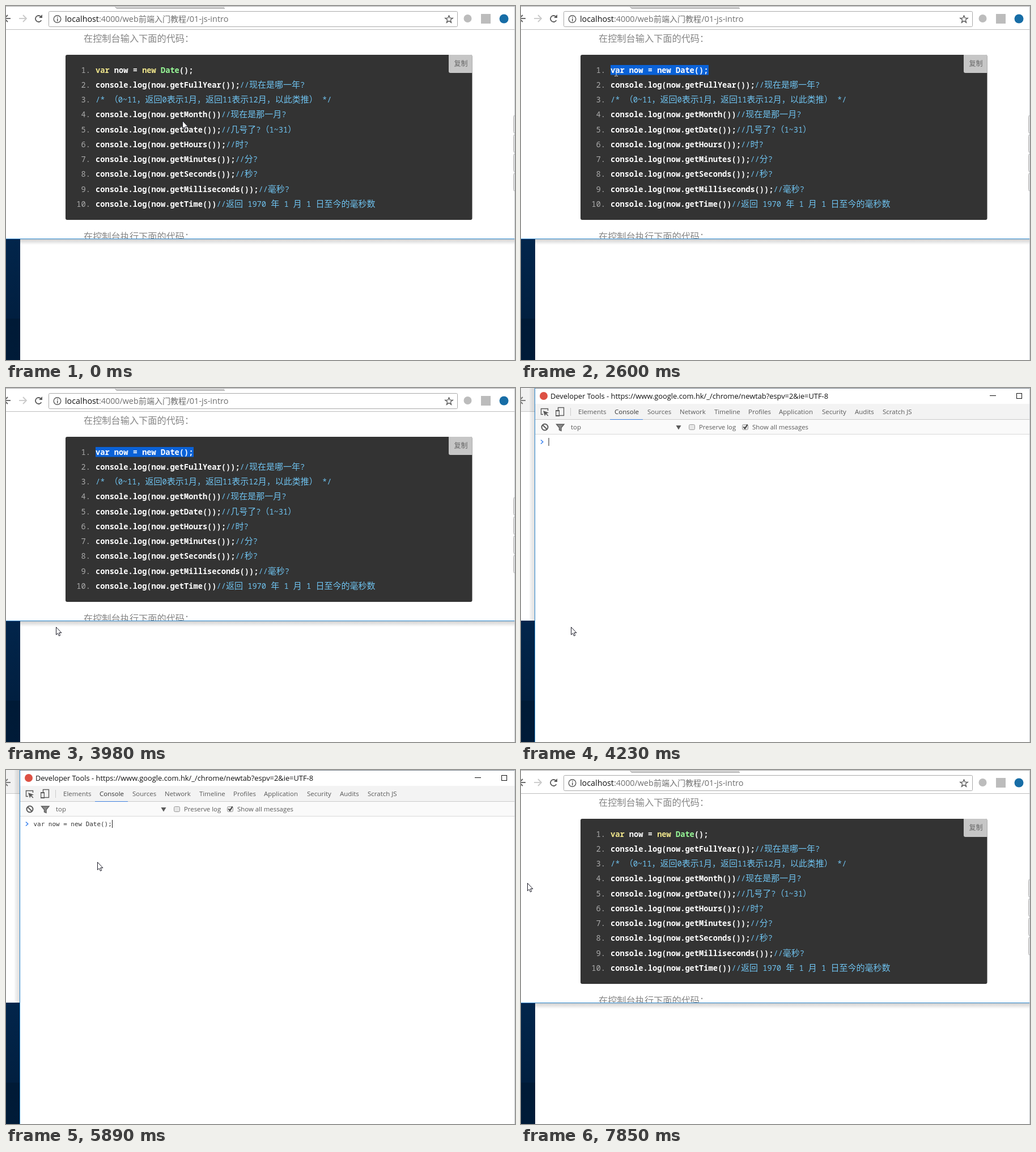
Write an HTML page with a canvas that moves like this. It is 898 by 624 pixels and loops after 8000 ms.

```html
<!DOCTYPE html>
<html lang="zh-CN">
<head>
<meta charset="utf-8">
<title>Console demo</title>
<style>
html, body { margin: 0; width: 100%; height: 100%; overflow: hidden; background: #fff; }
canvas { display: block; }
</style>
</head>
<body>
<canvas id="stage" width="898" height="624"></canvas>
<script>
const g = document.getElementById('stage').getContext('2d');
const LOOP = 8000;
const UI = '"Open Sans", "Noto Sans", sans-serif';
const HAN = '"Noto Sans CJK SC", "Noto Sans CJK", sans-serif';
const CODE = '"Noto Sans Mono", "DejaVu Sans Mono", monospace';
const CONSOLE = '"DejaVu Sans Mono", "Noto Sans Mono", monospace';
const SKY = '#6fc3f0';

const LINES = [
  'var now = new Date();',
  'console.log(now.getFullYear());//现在是哪一年?',
  '/* （0~11，返回0表示1月，返回11表示12月，以此类推） */',
  'console.log(now.getMonth())//现在是那一月?',
  'console.log(now.getDate());//几号了?（1~31）',
  'console.log(now.getHours());//时?',
  'console.log(now.getMinutes());//分?',
  'console.log(now.getSeconds());//秒?',
  'console.log(now.getMilliseconds());//毫秒?',
  'console.log(now.getTime())//返回 1970 年 1 月 1 日至今的毫秒数'
];

// Pointer moves: start, end, number of jumps, goal x, goal y
const MOVES = [
  [380, 500, 2, 400, 168], [630, 880, 3, 352, 120],
  [1190, 2160, 8, 159, 120], [2320, 2600, 3, 168, 117],
  [2870, 3300, 4, 196, 124], [3570, 3980, 4, 88, 421],
  [4370, 4520, 2, 98, 175], [4650, 4920, 3, 101, 158],
  [5200, 5890, 6, 161, 162], [7030, 7450, 4, 11, 199]
];

function pointer(t) {
  let x = 311, y = 202;
  for (const [from, to, n, gx, gy] of MOVES) {
    if (t < from) break;
    const k = Math.min(1, (Math.floor((t - from) / (to - from) * (n - 1) + 1e-6) + 1) / n);
    x += (gx - x) * k;
    y += (gy - y) * k;
  }
  return [x, y];
}

function rect(x, y, w, h, color) {
  g.fillStyle = color;
  g.fillRect(x, y, w, h);
}

function round(x, y, w, h, r, fill, line) {
  g.beginPath();
  g.roundRect(x, y, w, h, r);
  if (fill) { g.fillStyle = fill; g.fill(); }
  if (line) { g.strokeStyle = line; g.lineWidth = 1; g.stroke(); }
}

function path(points, color, width, fill) {
  g.beginPath();
  points.forEach(([x, y], i) => i ? g.lineTo(x, y) : g.moveTo(x, y));
  if (fill) { g.closePath(); g.fillStyle = fill; g.fill(); }
  if (width) { g.strokeStyle = color; g.lineWidth = width; g.stroke(); }
}

function arc(x, y, r, color, width, a = 0, b = 7) {
  g.beginPath();
  g.arc(x, y, r, a, b);
  g.strokeStyle = color;
  g.lineWidth = width;
  g.stroke();
}

function dot(x, y, r, color) {
  g.beginPath();
  g.arc(x, y, r, 0, 7);
  g.fillStyle = color;
  g.fill();
}

function text(s, x, y, font, color) {
  g.font = font;
  g.fillStyle = color;
  g.fillText(s, x, y);
  return x + g.measureText(s).width;
}

function fade(x, y, w, h, vertical, from, to) {
  const p = g.createLinearGradient(x, y, vertical ? x : x + w, vertical ? y + h : y);
  p.addColorStop(0, from);
  p.addColorStop(1, to);
  rect(x, y, w, h, p);
}

// Latin in the code face, Chinese on a 15px grid
function mixed(s, x, y, color, weight = 600) {
  for (const run of s.match(/[\x00-\x7f]+|[^\x00-\x7f]+/g)) {
    const han = run.charCodeAt(0) > 127;
    x = text(run, x, y, han ? `400 15px ${HAN}` : `${weight} 13.7px ${CODE}`, color);
  }
  return x;
}

function firstLine(selected) {
  const pick = c => selected ? '#fff' : c;
  let x = mixed('var', 158, 117.5, pick('#f0e68c'), 700);
  x = mixed(' now = ', x, 117.5, '#fff');
  x = mixed('new', x, 117.5, pick('#f0e68c'), 700);
  x = mixed(' Date', x, 117.5, pick('#98fb98'));
  mixed('();', x, 117.5, '#fff');
}

function codeLine(s, y) {
  const cut = s.search(/\/\/|\/\*/);
  const x = cut > 0 ? mixed(s.slice(0, cut), 158, y, '#fff') : 158;
  mixed(s.slice(cut), x, y, SKY, 500);
}

function desktop(w) {
  fade(0, 411, w, 140, true, '#02254b', '#011f40');
  fade(0, 551, w, 73, true, '#001a36', '#001b38');
}

function backArrow(color) {
  path([[-6, 22], [8, 22]], color, 1.8);
  path([[3, 16], [-3, 22], [3, 28]], color, 1.8);
}

function toolbar() {
  rect(0, 0, 898, 1, '#a9a9a9');
  path([[192, 0], [195, 4], [386, 4], [384, 0]], '', 0, '#cfcfcf');
  path([[192, 0.5], [195, 4.5], [386, 4.5]], '#aaa', 1);
  rect(0, 41, 898, 1, '#bdbdbd');
  backArrow('#5a5a5a');
  path([[23, 22], [36, 22]], '#c9c9c9', 1.8);
  path([[30, 16], [36, 22], [30, 28]], '#c9c9c9', 1.8);
  arc(57.5, 22.5, 5.5, '#5a5a5a', 1.8, 0.5, 5.5);
  path([[64, 15], [64, 21], [58, 21]], '', 0, '#5a5a5a');
  round(75.5, 9.5, 721, 27, 2, '#fff', '#a9a9a9');
  arc(90.5, 23, 6.3, '#5a5a5a', 1.4);
  rect(90, 22, 1.5, 5, '#5a5a5a');
  rect(90, 19, 1.5, 1.6, '#5a5a5a');
  text('localhost', 104, 28, `14.3px ${UI}`, '#111');
  text(':4000/web', 164, 28, `14.3px ${UI}`, '#6e6e6e');
  text('前端入门教程', 234, 28, `300 14px ${HAN}`, '#6e6e6e');
  text('/01-js-intro', 318.5, 28, `14.5px ${UI}`, '#6e6e6e');
  const star = [];
  for (let i = 0; i <= 10; i++) {
    const r = i % 2 ? 2.9 : 7, a = i * Math.PI / 5 - Math.PI / 2;
    star.push([781.5 + r * Math.cos(a), 23.5 + r * Math.sin(a)]);
  }
  path(star, '#555', 1.3);
  dot(814.5, 22, 7, '#bcbcbc');
  rect(838, 14, 17, 17, '#bcbcbc');
  dot(878.5, 22.5, 8, '#176da6');
}

function page(selFrom) {
  rect(0, 0, 898, 624, '#fff');
  text('在控制台输入下面的代码：', 137, 63, `300 16.2px ${HAN}`, '#858585');
  round(105, 86, 717.5, 291, 3, '#333');
  round(781, 86, 41.5, 32, [0, 3, 0, 3], '#c6c6c6');
  text('复制', 790.5, 106, `300 12px ${HAN}`, '#666');
  LINES.forEach((s, i) => {
    const y = 117.5 + i * 26.27;
    g.textAlign = 'right';
    text(i + 1 + '.', 149, y, `13.7px ${CODE}`, '#aaa');
    g.textAlign = 'left';
    if (i) codeLine(s, y); else firstLine(false);
  });
  if (selFrom < 331) {
    g.save();
    g.beginPath();
    g.rect(selFrom, 104, 331 - selFrom, 17.5);
    g.clip();
    rect(158, 104, 173, 18, '#0a62d8');
    firstLine(true);
    g.restore();
  }
  text('在控制台执行下面的代码：', 137, 411.5, `300 16.2px ${HAN}`, '#858585');
  for (let y = 192; y < 300; y += 34) round(895.5, y + 0.5, 12, 32, 3, '#f4f4f4', '#aaa');
  toolbar();
  rect(0, 410, 898, 214, '#fff');
  desktop(25);
  fade(25, 411, 873, 10, true, '#cfcfcf', '#fff');
  rect(0, 410, 898, 1, '#2a86cc');
  rect(897, 0, 1, 624, '#c4c8cc');
}

function chevron(y, color) {
  path([[35, y - 3.5], [38.7, y], [35, y + 3.5]], color, 1.6);
}

function checkbox(x, on) {
  round(x + 0.5, 64.5, 10, 9, 2, '#e6e6e6', '#999');
  if (on) path([[x + 2.5, 68.5], [x + 5, 71.5], [x + 9.5, 64.5]], '#333', 1.9);
}

function tools(t) {
  rect(0, 0, 898, 624, '#fff');
  rect(0, 0, 24, 41, '#f1f1f1');
  rect(0, 41, 24, 1, '#c8c8c8');
  backArrow('#707070');
  fade(15, 0, 9, 410, false, 'rgba(0,0,0,.03)', 'rgba(0,0,0,.13)');
  rect(0, 410, 24, 1, '#12345a');
  desktop(24);
  rect(24, 0, 874, 624, '#fff');
  rect(24, 0, 874, 1, '#7d8790');
  rect(24, 0, 1, 624, '#2a86cc');
  rect(897, 0, 1, 624, '#c4c8cc');

  dot(40, 14, 7, '#dd5144');
  text('Developer Tools - https://www.google.com.hk/_/chrome/newtab?espv=2&ie=UTF-8',
    52, 18.5, `12.85px ${UI}`, '#111');
  rect(827, 13, 11, 1, '#111');
  g.strokeStyle = '#111';
  g.lineWidth = 1;
  g.strokeRect(874.5, 9.5, 9, 9);

  rect(25, 28, 872, 27, '#f3f3f3');
  rect(25, 56, 872, 25, '#fafafa');
  rect(25, 55, 872, 1, '#cccccc');
  rect(25, 81, 872, 1, '#d9d9d9');
  rect(157, 55, 58, 1, '#3f80dc');
  path([[39, 46.5], [35.5, 46.5], [35.5, 36.5], [47.5, 36.5], [47.5, 40]], '#5a5a5a', 1.4);
  path([[39, 40], [49, 43.5], [45, 45], [48.5, 48.5], [47.2, 49.5], [43.8, 46], [42, 49.5]], '', 0, '#5a5a5a');
  g.strokeStyle = '#5a5a5a';
  g.lineWidth = 1.4;
  g.strokeRect(65.5, 34.5, 10, 14);
  rect(61, 39, 7, 11, '#5a5a5a');
  rect(62.3, 41, 4.4, 7, '#f3f3f3');
  rect(87, 35, 1, 14, '#ccc');
  [['Elements', 101], ['Console', 165], ['Sources', 223], ['Network', 280], ['Timeline', 341],
   ['Profiles', 401], ['Application', 455], ['Security', 531], ['Audits', 589], ['Scratch JS', 638]]
    .forEach(([s, x]) => text(s, x, 46.3, `11.5px ${UI}`, s === 'Console' ? '#333' : '#5a5a5a'));

  arc(42, 69, 5.5, '#5a5a5a', 2);
  path([[38, 65], [46, 73]], '#5a5a5a', 2);
  path([[62.5, 64], [76, 64], [71, 70], [71, 75.5], [67.5, 74], [67.5, 70]], '#5a5a5a', 1.3, '#8a8a8a');
  text('top', 88, 73.3, `11.4px ${UI}`, '#5a5a5a');
  path([[273.5, 66], [282.5, 66], [278, 73.5]], '', 0, '#5a5a5a');
  checkbox(296, false);
  text('Preserve log', 314, 73.3, `11.4px ${UI}`, '#5a5a5a');
  checkbox(390, true);
  text('Show all messages', 408, 73.3, `11.4px ${UI}`, '#5a5a5a');
  output(t);
}

function output(t) {
  const font = `10.95px ${CONSOLE}`;
  const done = t >= 6630, pasted = t >= 5750;
  chevron(95, done ? '#777' : '#3f86f0');
  if (pasted && !done) text(LINES[0], 48.5, 99, font, '#333');
  if (done) {
    let x = 48.5;
    for (const s of LINES[0].split(/(var|new)/)) {
      x = text(s, x, 99, font, /^(var|new)$/.test(s) ? '#b0229a' : '#333');
    }
    path([[37.5, 110], [34, 113], [37.5, 116]], '#999', 1.2);
    rect(38.5, 112.3, 1.5, 1.5, '#999');
    text('undefined', 48.5, 117.3, font, '#757575');
    if (t >= 7030) rect(25, 121, 872, 1, '#ededed');
    chevron(132, '#3f86f0');
  }
  const on = t < 4700 || (t >= 5200 && t < 6360) || (t >= 6630 && t < 7160);
  if (on) rect(pasted && !done ? 187 : 48.5, done ? 125 : 88, 1, 14, '#222');
}

function cursor(t) {
  const [x, y] = pointer(t);
  if (t >= 630 && t < 3570) {
    rect(x - 0.5, y - 6, 1, 12, '#d8d8d8');
    for (const end of [y - 7, y + 6]) {
      rect(x - 3, end, 2.5, 1, '#d8d8d8');
      rect(x + 0.5, end, 2.5, 1, '#d8d8d8');
    }
    return;
  }
  const shape = [[0, 0], [0, 13.5], [3, 10.8], [5, 15.5], [7.2, 14.5], [5.2, 10], [9.4, 10], [0, 0]];
  path(shape.map(([a, b]) => [x + a + 0.5, y + b + 0.5]), '#1c1c28', 1, '#fff');
}

function draw(t) {
  if (t >= 4230 && t < 7700) {
    tools(t);
  } else {
    const x = pointer(Math.min(t, 2160))[0];
    const left = 158 + Math.max(0, Math.round((x - 158) / 8.23)) * 8.23;
    page(t >= 1190 && t < 7850 ? left : 331);
  }
  cursor(t);
}

function tick() {
  draw(performance.now() % LOOP);
  requestAnimationFrame(tick);
}
tick();
</script>
</body>
</html>
```
